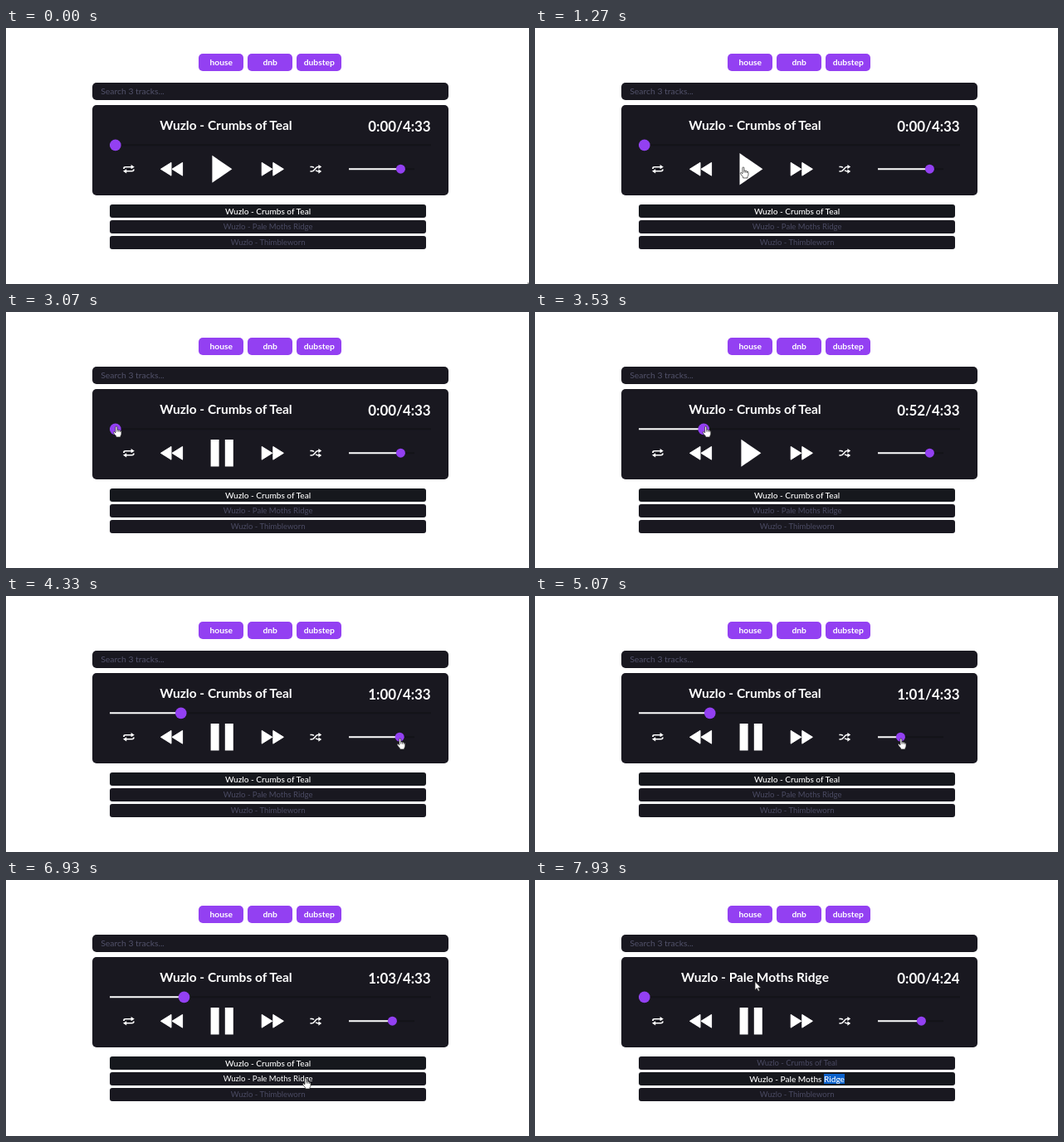
An HTML page that plays this animation: 630 by 309 pixels, repeating every 8 s.

```html
<!DOCTYPE html>
<html lang="en">
<head>
<meta charset="utf-8">
<title>Music player</title>
<style>
  html, body { margin: 0; width: 100%; height: 100%; overflow: hidden; background: #fff; }
  body { position: relative; font-family: Lato, "Open Sans", sans-serif; color: #fff; }
  div, svg { position: absolute; }
  svg { left: 0; top: 0; }
  .tag, .row, .title, .time { text-align: center; white-space: pre; }
  .tag { top: 30.6px; width: 54px; height: 21.6px; border-radius: 5px; background: #9340f2; font-size: 10.3px; font-weight: 700; line-height: 21.5px; }
  .bar { left: 103.5px; width: 429.5px; background: #191820; border-radius: 5px; }
  .search { top: 65.6px; height: 21.2px; text-indent: 10.7px; font-size: 10.4px; line-height: 21.8px; color: #52526a; }
  .player { top: 92.6px; height: 109.6px; }
  .title { left: 135px; width: 260px; top: 106.4px; font-size: 15.5px; font-weight: 700; line-height: 23px; }
  .time { left: 424px; width: 100px; top: 107px; font-size: 16.9px; font-weight: 700; line-height: 23px; }
  .row { left: 124.8px; width: 381.6px; height: 16px; border-radius: 3px; background: #191820; font-size: 9.5px; line-height: 16.4px; color: #4b4b63; }
  .row.hover { color: #fff; }
  .row.active { color: #fff; background: #16181d; font-size: 10.1px; font-weight: 500; }
  .row.picked span { background: #0b62cc; }
</style>
</head>
<body>
<div class="tag" style="left:232.2px">house</div>
<div class="tag" style="left:291.2px">dnb</div>
<div class="tag" style="left:350.3px">dubstep</div>
<div class="bar search">Search 3 tracks...</div>
<div class="bar player"></div>
<div class="title" id="title"></div>
<div class="time" id="time"></div>
<div class="row">Wuzlo - Crumbs of Teal</div>
<div class="row">Wuzlo - Pale Moths <span>Ridge</span></div>
<div class="row">Wuzlo - Thimbleworn</div>

<svg width="630" height="309" viewBox="0 0 630 309">
  <g fill="none" stroke-width="2">
    <path d="M125 141.3H512M413 170.3H492" stroke="#131318"/>
    <path id="seekLine" stroke="#fff"/>
    <path id="volLine" stroke="#fff"/>
  </g>
  <g fill="#9340f2">
    <circle id="seekDot" r="6.8" cy="141.4"/>
    <circle id="volDot" r="5.5" cy="170.2"/>
  </g>
  <g fill="#fff">
    <g id="skip" stroke="#fff" stroke-linejoin="round">
      <path d="M186.4 170.3L199 162.4V178.2ZM200 170.3L212.6 162.4V178.2Z"/>
    </g>
    <use href="#skip" transform="translate(520.8 0) scale(-1 1)"/>
    <g id="main">
      <path id="play" d="M-11.8 -16.5L12.2 0L-11.8 16.5Z"/>
      <path id="pause" d="M-13.6 -16.3h10v32.6h-10zM3.6 -16.3h10v32.6h-10z"/>
    </g>
  </g>
  <g transform="translate(0 25.5) scale(1 .85)">
    <path d="M150.6 164.2l4.2 3.1l-4.2 3.1zM145.2 170.2l-4.2 3.1l4.2 3.1zM376.4 164l3.8 3.1l-3.8 3.1zM376.4 170.5l3.8 3.1l-3.8 3.1z" fill="#fff"/>
    <g fill="none" stroke="#fff" stroke-width="1.8">
      <path d="M142 170v-.7q0-2 2-2h7.5M153.8 170.6v.7q0 2-2 2h-7.5"/>
      <path d="M366.4 173.6h2c3.5 0 4-6.5 7.6-6.5h1M366.4 167.1h2q1.5 0 2.4 1.3M373.2 172.2q1.2 1.4 2.8 1.4h1"/>
    </g>
  </g>
  <g id="cursor" stroke="#222" stroke-width=".7" stroke-linejoin="round" fill="#fff">
    <path id="arrow" d="M0 0V10.2L2.3 8.1L3.9 11.7L5.5 11L3.9 7.5H7.2Z"/>
    <g id="hand">
      <path d="M-1.1 .9Q-1.1 0 -.1 0T.9 .9V4.2Q2.2 3.5 2.8 4.6Q4 4.1 4.6 5.2Q6 5 6 6.5V8.9Q6 10.5 5 11.6V13H-.4V11.8Q-2.3 9.9 -3.5 7.7Q-3.8 6.4 -2.4 6.6L-1.1 7.9Z"/>
      <path d="M.9 4.2V6.6M2.8 4.6V6.8M4.6 5.2V7" fill="none"/>
    </g>
  </g>
</svg>

<script>
const LOOP = 8000, STEP = 1000 / 15;
const PLAY = 1730, GRAB = 3130, RELEASE = 3660, PICK = 7260;
const $ = id => document.getElementById(id);
const rows = [...document.querySelectorAll('.row')];
const tracks = rows.map(r => r.textContent);
const rowTop = i => 212.7 + 19 * i;
rows.forEach((row, i) => row.style.top = rowTop(i) + 'px');

// Pointer moves: start, end, x, y
const moves = [
  [430, 1000, 201, 194],   // in from the corner
  [1000, 1267, 251, 168],  // play button
  [2230, 3000, 133, 138],  // seek thumb
  [3070, 3640, 213, 138],  // drag
  [3670, 4030, 476, 172],  // volume thumb
  [4250, 5000, 441, 172],  // down
  [5380, 5930, 466, 172],  // up
  [6200, 6930, 361, 239],  // second track
  [7680, 7930, 265, 122.5] // title
];

const clamp = (v, lo, hi) => Math.min(hi, Math.max(lo, v));
const within = (v, lo, hi) => v >= lo && v < hi;
const show = (id, on) => $(id).setAttribute('display', on ? 'inline' : 'none');
const clock = s => Math.floor(s / 60) + ':' + String(s % 60).padStart(2, '0');

function ease(t, from, to) {
  const p = clamp((t - from) / (to - from), 0, 1);
  return p * p * (3 - 2 * p);
}

function pointer(t) {
  let x = 629, y = 307.5;
  for (const [from, to, mx, my] of moves) {
    const p = ease(t, from, to);
    x += (mx - x) * p;
    y += (my - y) * p;
  }
  return [x, y];
}

// Elapsed seconds and slider percent; the slider lags slightly in playback
function progress(t) {
  if (t >= PICK) return [0, 0];
  if (t >= RELEASE) {
    const s = 58 + (t - 2750) / 750;
    return [Math.floor(s), Math.floor((s - 1.18) / 2.73)];
  }
  const percent = Math.round((pointer(Math.max(t, 3050))[0] - 133) / 3.76);
  return [Math.round(percent * 2.73), percent];
}

function draw(time) {
  // Screen updates fifteen times a second
  const t = Math.floor((time + 5) / STEP) * STEP + 1;
  const song = t >= PICK ? 1 : 0;
  const [seconds, percent] = progress(t);
  const [x, y] = pointer(t);

  $('title').textContent = tracks[song];
  $('time').textContent = clock(seconds) + '/' + (t >= 7730 ? '4:24' : '4:33');

  const seek = 131.8 + percent * 3.76;
  $('seekDot').setAttribute('cx', seek);
  $('seekLine').setAttribute('d', `M125 141.3H${seek}`);

  const vol = pointer(clamp(t, 4200, 6000))[0] - .6;
  $('volDot').setAttribute('cx', vol);
  $('volLine').setAttribute('d', `M413 170.3H${vol}`);

  const playing = t >= PLAY && !within(t, GRAB, RELEASE);
  const scale = 1 + .2 * (ease(t, 1000, 1370) - ease(t, 2400, 2670));
  show('pause', playing);
  show('play', !playing);
  $('main').setAttribute('transform', `translate(260.2 170.3) scale(${scale})`);

  const hovered = rows.findIndex((r, i) => within(y, rowTop(i), rowTop(i) + 16) && within(x, 125, 507));
  const hand = hovered >= 0
    || within(x, 246, 276) && within(y, 152, 190)
    || Math.hypot(x - seek, y - 141.4) < 9
    || within(x, 413, 492) && within(y, 164, 177);
  show('hand', hand);
  show('arrow', !hand);
  $('cursor').setAttribute('transform', `translate(${x} ${y})`);

  rows.forEach((row, i) => {
    row.classList.toggle('active', i === song);
    row.classList.toggle('hover', i === hovered);
    row.classList.toggle('picked', i === 1 && t >= 7330);
  });
}

function frame() {
  draw(performance.now() % LOOP);
  requestAnimationFrame(frame);
}
frame();
</script>
</body>
</html>
```
